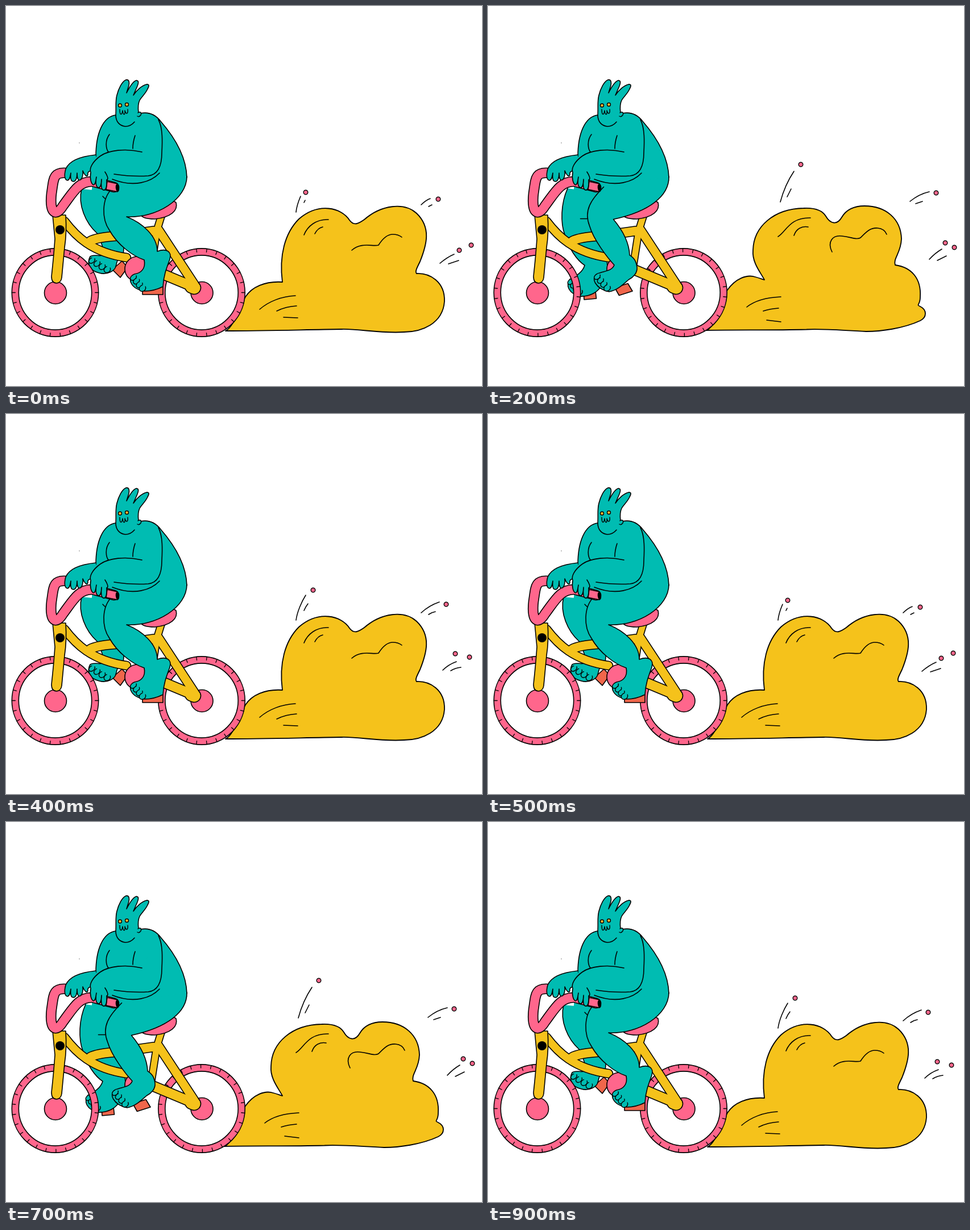
Animation of 837 by 669 pixels, one loop 1000 ms. Source, as an HTML page with a canvas:

```html
<!DOCTYPE html>
<html lang="en">
<head>
<meta charset="utf-8">
<title>Bike ride</title>
<style>
html, body { margin: 0; width: 100%; height: 100%; overflow: hidden; background: #fff; }
canvas { display: block; }
</style>
</head>
<body>
<canvas id="stage" width="837" height="669"></canvas>
<script>
const ctx = document.getElementById('stage').getContext('2d');
const TEAL = '#00bcb2', PINK = '#ff668c', YELLOW = '#f5c21b', RED = '#f0664b', INK = '#000';
const TAU = Math.PI * 2;
ctx.lineCap = ctx.lineJoin = 'round';

function shape(d, fill, line = 1.6) {
  const path = new Path2D(d);
  if (fill) { ctx.fillStyle = fill; ctx.fill(path); }
  if (line) { ctx.strokeStyle = INK; ctx.lineWidth = line; ctx.stroke(path); }
}

function dot(x, y, r, fill, line = 1.6) {
  ctx.beginPath();
  ctx.arc(x, y, r, 0, TAU);
  ctx.fillStyle = fill;
  ctx.fill();
  if (line) { ctx.strokeStyle = INK; ctx.lineWidth = line; ctx.stroke(); }
}

// Outlined tubes that merge where they meet
function tubes(list, color) {
  for (const edge of [1.6, -1.6]) {
    ctx.strokeStyle = edge > 0 ? INK : color;
    for (const [d, w] of list) {
      ctx.lineWidth = w + edge;
      ctx.stroke(new Path2D(d));
    }
  }
}

// Halfway between two paths with the same commands
function mix(a, b) {
  const num = /[\d.]+/g, other = b.match(num);
  let i = 0;
  return a.replace(num, v => (+v + +other[i++]) / 2);
}

const high = {
  farLeg: 'M133 322C126 350 140 382 160 400C166 412 172 428 172 438C166 442 156 436 148 441C142 452 146 466 164 470C178 474 192 466 193 458C196 452 192 448 206 440L215 330',
  farPedal: 'M187 464L204 449L214 460L201 478Z',
  farToes: '151 448 178 464',
  crease: 'M170 335L178 343',
  leg: 'M186 322C168 340 168 375 182 395C196 420 222 440 243 447C246 462 238 470 226 472C212 478 218 498 244 502C258 502 268 498 276 494C277 475 282 462 288 446C292 432 282 426 266 432C266 405 240 382 212 371C265 374 318 340 318 300',
  pedal: 'M240 494L276 494L276 508L240 508Z',
  toes: '224 478 240 497'
};
const front = {
  farLeg: 'M144 320C134 345 136 380 141 410C144 428 148 440 144 455C138 470 122 474 114 481C108 494 118 508 140 512C160 510 174 496 175 480C176 470 184 460 188 446L186 330',
  farPedal: 'M144 500L172 497L175 512L146 516Z',
  farToes: '117 485 136 503',
  crease: 'M163 368L173 368',
  leg: 'M188 322C166 342 166 370 180 392C192 410 206 425 208 440C208 452 200 457 190 458C178 464 188 482 212 486C222 484 232 478 236 470C238 462 246 456 248 444C249 430 246 424 243 419C240 398 230 380 219 361C280 356 317 335 317 300',
  pedal: 'M225 478L240 463L256 478L240 493Z',
  toes: '190 463 207 480'
};
const low = {
  farLeg: 'M136 322C122 350 118 385 130 398C140 425 165 456 196 458C194 470 184 478 174 481C164 490 166 504 182 510C200 514 216 510 226 500C236 492 236 480 232 472L214 330',
  farPedal: 'M192 507L206 507L206 518L192 518Z',
  farToes: '174 486 185 504',
  crease: 'M162 381L176 381',
  leg: 'M219 315C196 340 170 350 177 382C180 415 215 462 236 472C228 482 208 476 196 484C180 492 190 514 214 520C232 518 246 500 258 494C272 494 280 484 276 476C272 462 262 460 255 458C256 430 242 408 222 390C285 368 321 335 319 300',
  pedal: 'M221 514L252 514L252 526L221 526Z',
  toes: '194 490 212 513'
};
const between = {};
for (const key in front) between[key] = mix(front[key], low[key]);

const clouds = [
  {
    body: 'M386 572C400 566 412 528 421 512C432 495 455 484 486 486C480 440 490 400 515 375C550 345 590 355 604 377C612 388 620 383 630 376C660 350 700 345 722 365C748 390 740 420 728 450C722 462 719 468 722 471C745 470 772 485 771 520C768 560 730 574 700 574C660 577 620 568 590 569C520 570 450 572 386 572',
    folds: 'M524 403C530 388 545 375 567 376M543 401Q548 391 557 389M608 430C625 415 645 424 655 421C662 410 670 402 680 402Q690 402 696 407M446 534C462 520 485 511 509 510M476 537Q492 529 511 528M488 548L513 549'
  },
  {
    body: 'M384 571C400 566 408 520 421 500C435 480 455 472 470 477C478 479 484 482 486 482C480 470 464 452 466 430C467 388 503 357 555 356C575 355 588 360 594 370C602 384 614 386 622 372C632 355 650 352 662 352C700 352 726 375 727 410C726 435 712 445 716 456C745 460 762 480 760 512C760 528 752 525 760 529C772 535 772 548 760 554C730 568 690 573 665 573C620 571 590 568 560 569.5C500 571 440 570 384 571',
    folds: 'M510 406C524 398 530 372 567 373M538 404C542 392 552 387 563 389M605 433C596 415 606 403 622 405C640 407 648 412 655 408C665 398 672 390 685 391Q697 392 701 402M455 530C470 518 492 513 515 512M484 537Q496 533 511 532M490 553L515 556'
  }
];

const debris = [
  {
    dots: [[527, 328], [760, 340], [797, 430], [818, 421]],
    trails: 'M510 363C511 352 515 342 518 335M524 346L526 342M730 350Q738 342 746 339M743 353L749 350M763 453Q776 442 788 437M778 454L796 448'
  },
  {
    dots: [[540, 310], [774, 335], [790, 422], [815, 428]],
    trails: 'M510 363C512 348 520 330 527 319M524 346Q527 339 531 334M730 350Q744 337 762 331M743 353Q749 349 755 348M768 451Q778 441 792 436M782 452Q790 447 800 446'
  },
  {
    dots: [[550, 279], [788, 329], [804, 417], [820, 425]],
    trails: 'M514 345Q522 315 538 291M526 336L533 322M742 344Q758 331 776 327M752 348L764 344M776 446Q786 435 798 428M790 448L806 440'
  }
];

// pose, cloud, debris for each drawing of the pedal cycle
const cycle = [
  [high, 0, 0], [front, 1, 1], [between, 1, 2], [low, 1, 0], [high, 0, 1]
];

function drawDust(cloud, bits) {
  shape(cloud.body, YELLOW, 1.8);
  shape(cloud.folds);
  shape(bits.trails);
  for (const [x, y] of bits.dots) dot(x, y, 3.8, PINK, 1.4);
}

function drawTyre(x, turn, rx, ry) {
  const y = 504.5, ring = new Path2D(), ticks = new Path2D();
  ring.ellipse(x, y, rx - 6, ry - 6, 0, 0, TAU);
  for (let i = 0; i < 26; i++) {
    const a = turn + i * TAU / 26, c = Math.cos(a), s = Math.sin(a);
    ticks.moveTo(x + c * (rx - 6), y + s * (ry - 6));
    ticks.lineTo(x + c * rx, y + s * ry);
  }
  tubes([[ring, 12]], PINK);
  shape(ticks, null, 1.3);
  dot(x + 0.5, 505, 19.5, PINK);
}

function drawToes(row) {
  const [x1, y1, x2, y2] = row.split(' ').map(Number);
  for (let i = 0; i < 4; i++) {
    const k = i / 3, x = x1 + (x2 - x1) * k, y = y1 + (y2 - y1) * k;
    ctx.beginPath();
    ctx.ellipse(x, y, 6, 4.2 + k, -0.7, 0, TAU);
    ctx.fillStyle = TEAL;
    ctx.fill();
    ctx.beginPath();
    ctx.ellipse(x, y, 6, 4.2 + k, -0.7, 0.2, 5.2);
    ctx.strokeStyle = INK;
    ctx.lineWidth = 1.4;
    ctx.stroke();
  }
}

function drawFrame() {
  tubes([
    ['M103 379C122 404 150 434 212 443', 15],
    ['M148 414Q160 407 200 404.5L260 396', 16.5],
    ['M273 370L265 396L255 460', 12.5],
    ['M268 394L331 490', 16],
    ['M259 465L326 493', 18],
    ['M326 494L331 496', 23]
  ], YELLOW);
  shape('M82 368L86 410Q84 440 80 476Q80 488 89 488Q97 487 98 478L103 425Q107 400 105 368Z', YELLOW);
  dot(95, 394, 8, INK, 0);
}

function drawTorso() {
  shape('M193 192C170 195 158 225 158 265L150 330L196 336L318 300C317 262 292 226 272 203C262 190 250 186 236 189Z', TEAL, 0);
  shape('M193 192C170 195 158 225 158 265M318 302C317 262 292 226 272 203C262 190 250 186 236 189');
  shape('M182 226C174 236 175 252 181 258M227 228Q223 240 223 251');
}

function drawHead() {
  shape('M226 204C220 211 215 212 210 212C200 211 193 204 193 192C194 178 192 168 195 157C198 145 204 133 211 130C217 129 217 135 216 140L212 153C217 143 223 133 229 131C234 131 233 136 231 141L224 157C230 148 239 140 247 138C252 137 252 141 249 146C245 155 238 160 235 166C232 172 232 180 233 188', TEAL);
  shape('M232 188C236 185 239 188 237 192Q234 196 231 194', TEAL, 1.4);
  dot(200.5, 175, 3, '#f8b62d', 1.4);
  dot(212.5, 173.5, 3, '#f8b62d', 1.4);
  shape('M200 182C200 193 204 193 205 184C206 193 210 193 209 184C211 192 215 190 214 182', null, 1.4);
}

function drawArms() {
  tubes([['M106 294C82 292 84 305 80 330C76 365 88 372 100 352C118 328 128 308 152 309L190 319', 17]], PINK);
  shape('M178 309L196 313L196 327L176 323Z', PINK);
  ctx.beginPath();
  ctx.ellipse(196, 320, 3.2, 7, -0.1, 0, TAU);
  ctx.fillStyle = INK;
  ctx.fill();
  shape('M158 262C138 264 112 270 105 287C102 298 103 306 108 307C112 307 113 300 114 294C113 304 114 309 119 309C124 308 125 300 125 294C125 302 126 308 131 306C134 304 136 297 135 290C139 300 143 301 144 297C143 292 146 289 158 290', TEAL);
  const hand = 'M239 257C210 250 180 254 166 264C152 274 146 286 149 293C147 304 150 314 154 315C158 314 158 306 159 301C157 311 158 319 163 320C167 319 168 310 168 305C167 315 167 325 173 324C178 322 177 312 177 306C181 305 178 298 174 292';
  shape('M268 200C276 215 275 240 274 258C274 280 268 296 250 299C235 300 210 299 192 297L170 262L239 257Z', TEAL, 0);
  shape(hand + 'L190 302L239 290Z', TEAL, 0);
  shape(hand);
  shape('M268 200C276 215 275 240 274 258C274 280 268 297 250 299C235 300 210 299 190 296');
  shape('M270 294C255 310 225 320 187 305');
}

function draw(step) {
  const [pose, cloud, bits] = cycle[step % 5];
  const [rx, ry] = pose === low ? [77, 76.8] : [76.2, 77.6];
  const turn = -0.07 * (step % 5 % 4);
  ctx.fillStyle = '#fff';
  ctx.fillRect(0, 0, 837, 669);
  dot(129, 241, 0.7, '#555', 0);

  drawDust(clouds[cloud], debris[bits]);
  dot(344, 504.5, 70, '#fff', 0);
  shape(pose.farPedal, RED);
  shape(pose.farLeg, TEAL);
  drawToes(pose.farToes);
  shape(pose.crease);
  drawTyre(86.5, turn, rx, ry);
  drawTyre(344, turn, rx, ry);

  drawFrame();
  dot(231, 463, 22, PINK);
  shape('M236 362C240 350 290 338 299 346C303 360 290 372 262 375C245 375 235 372 236 362Z', PINK);
  drawTorso();
  shape(pose.pedal, RED);
  shape(pose.leg, TEAL);
  drawToes(pose.toes);
  drawArms();
  drawHead();
}

const start = performance.now();
let shown = -1;
function tick() {
  const step = Math.floor((performance.now() - start) / 100) % 10;
  if (step !== shown) draw(shown = step);
  requestAnimationFrame(tick);
}
tick();
</script>
</body>
</html>
```
